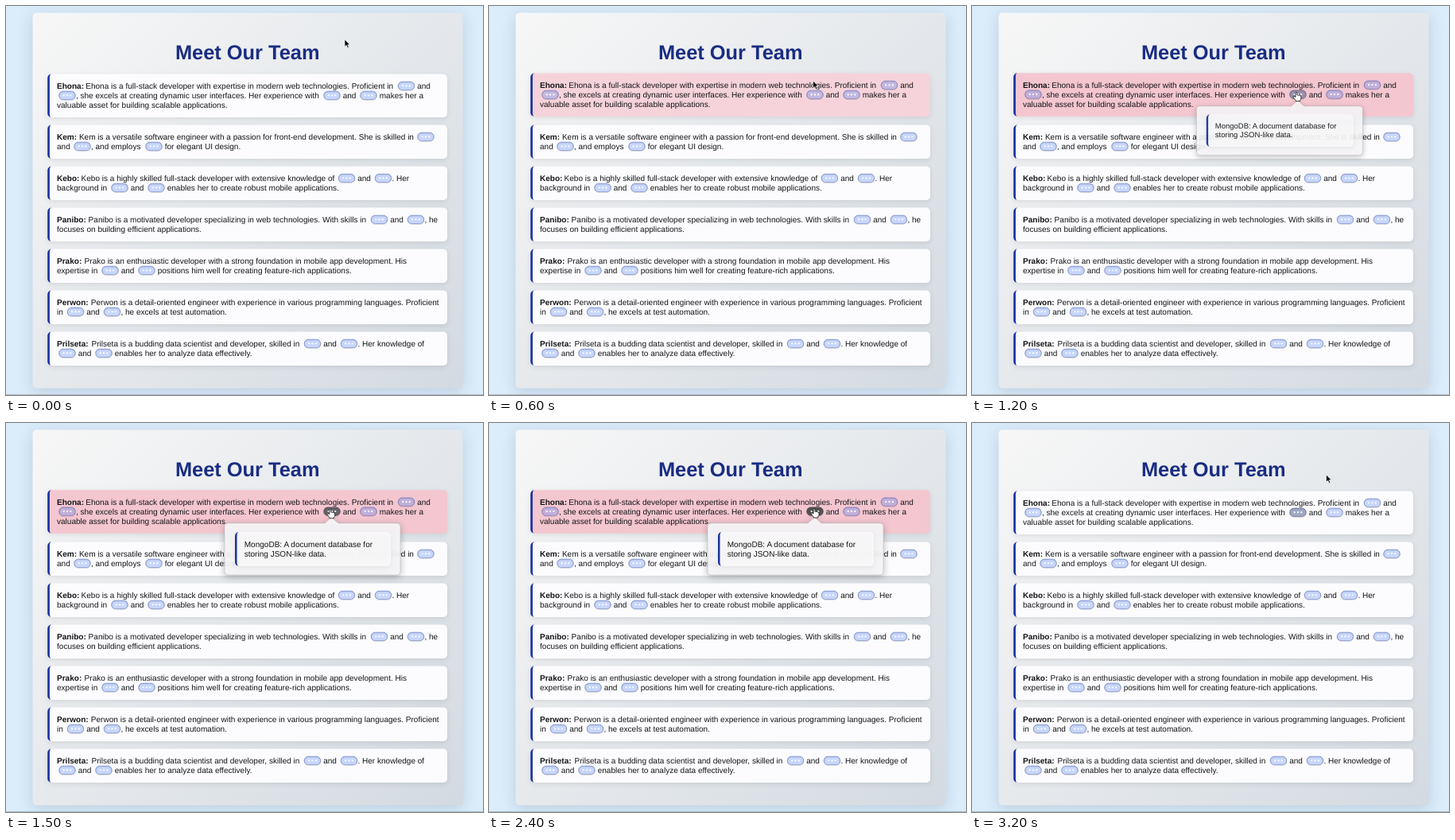
Animation of 600x489 px, one loop 3.3 s. Source, as an HTML page:

```html
<!DOCTYPE html>
<html lang="en">
<head>
<meta charset="utf-8">
<title>Meet Our Team</title>
<style>
  html, body { margin: 0; width: 100%; height: 100%; overflow: hidden; background: #dbecfa; }
  svg { display: block; width: 600px; height: 489px; }
  text { font: 10.05px Arial, "Liberation Sans", sans-serif; fill: #151618; white-space: pre; text-rendering: geometricPrecision; }
  .bold { font-weight: bold; }
  .title { font-size: 25.4px; font-weight: bold; fill: #1a2d82; text-anchor: middle; }
  .panel { filter: drop-shadow(0 4px 9px rgba(20, 50, 80, .16)); }
  .card { filter: drop-shadow(0 2px 3px rgba(0, 0, 0, .09)); }
  .popup { filter: drop-shadow(0 2px 4px rgba(0, 0, 0, .28)); }
</style>
</head>
<body>
<svg id="stage" viewBox="0 0 600 489">
  <defs>
    <linearGradient id="panelFill" gradientUnits="userSpaceOnUse" x1="51" y1="-9" x2="557" y2="497">
      <stop stop-color="#f7f7f7"/><stop offset="1" stop-color="#d3dae1"/>
    </linearGradient>
  </defs>
  <rect width="600" height="489" fill="#dbecfa"/>
  <rect class="panel" x="33.5" y="8.5" width="541" height="472" rx="5" fill="url(#panelFill)"/>
  <rect y="488" width="600" height="1" fill="#a9bac8"/>
  <text class="title" x="303.7" y="67.3">Meet Our Team</text>
  <g id="cards"></g>
  <g id="tooltip">
    <path class="popup" d="M279 126H401L409.5 118.500L418 126H492Q496 126 496 130V187Q496 191 492 191H279Q275 191 275 187V130Q275 126 279 126Z"
      fill="#f7f7f9" fill-opacity=".93" stroke="#bcbcc0" stroke-width=".6"/>
    <g id="note"></g>
  </g>
  <path id="arrow" d="M0 0V9.300L2.200 7.300L3.700 10.800L5.300 10.100L3.800 6.700H6.700Z" fill="#000" stroke="#fff" stroke-width=".7"/>
  <path id="hand" d="M-1 .8Q0-.4 1 .8V4Q2 3.300 2.800 4.200Q3.800 3.600 4.500 4.600Q5.800 4.200 6 5.600V8Q5.800 9.500 4.800 10.300V11.500H-.8V10.500Q-2.200 9-3.800 6.700Q-4.300 5.500-3 5.300Q-2 5.500-1 6.700Z"
    fill="#fff" stroke="#111" stroke-width=".8" stroke-linejoin="round"/>
</svg>
<script>
const LOOP = 3300, FRAME = 100, LINE = 12;
const byId = id => document.getElementById(id);

// "@x" places a chip centred on x
const people = [
  { name: "Ehona", x: 100.2, lines: [
    "Ehona is a full-stack developer with expertise in modern web technologies. Proficient in @503.5 and",
    "@77, she excels at creating dynamic user interfaces. Her experience with @410 and @456 makes her a",
    "valuable asset for building scalable applications."] },
  { name: "Kem", x: 91.9, lines: [
    "Kem is a versatile software engineer with a passion for front-end development. She is skilled in @528",
    "and @96, and employs @186 for elegant UI design."] },
  { name: "Kebo", x: 94.5, lines: [
    "Kebo is a highly skilled full-stack developer with extensive knowledge of @428.5 and @474.5. Her",
    "background in @143 and @189 enables her to create robust mobile applications."] },
  { name: "Panibo", x: 103.6, lines: [
    "Panibo is a motivated developer specializing in web technologies. With skills in @469.5 and @515.5, he",
    "focuses on building efficient applications."] },
  { name: "Prako", x: 98.6, lines: [
    "Prako is an enthusiastic developer with a strong foundation in mobile app development. His",
    "expertise in @131 and @177 positions him well for creating feature-rich applications."] },
  { name: "Perwon", x: 106.8, lines: [
    "Perwon is a detail-oriented engineer with experience in various programming languages. Proficient",
    "in @87.5 and @133.5, he excels at test automation."] },
  { name: "Prilseta", x: 107.5, lines: [
    "Prilseta is a budding data scientist and developer, skilled in @385.5 and @431.5. Her knowledge of",
    "@77 and @123 enables her to analyze data effectively."] }
];

function add(parent, tag, attrs, content) {
  const node = document.createElementNS("http://www.w3.org/2000/svg", tag);
  for (const key in attrs) node.setAttribute(key, attrs[key]);
  if (content) node.textContent = content;
  parent.append(node);
  return node;
}

// Rounded box whose left border tapers into the corners
function addBox(parent, x, y, width, height, border, opacity = 1) {
  const r = 5, bottom = y + height, inner = r - border;
  const box = add(parent, "rect", { class: "card", x, y, width, height, rx: r, fill: "#fcfcfe", "fill-opacity": opacity });
  add(parent, "path", { fill: "#1a32a0", d:
    `M${x + r} ${y}A${r} ${r} 0 0 0 ${x} ${y + r}V${bottom - r}A${r} ${r} 0 0 0 ${x + r} ${bottom}` +
    `A${inner} ${r} 0 0 1 ${x + border} ${bottom - r}V${y + r}A${inner} ${r} 0 0 1 ${x + r} ${y}Z` });
  return box;
}

function addChip(parent, cx, cy) {
  const shape = { x: cx - 10.2, y: cy - 5.2, width: 20.4, height: 10.4, rx: 5 };
  add(parent, "rect", { ...shape, y: cy - 4.5, fill: "none", stroke: "rgba(0,0,0,.2)" });
  const body = add(parent, "rect", { ...shape, "stroke-width": .8 });
  paintChip(body, 0);
  for (const dx of [-4.3, 0, 4.3]) add(parent, "circle", { cx: cx + dx, cy, r: 1.15, fill: "#fff" });
  return body;
}

function addLine(parent, line, start, y) {
  let x = start;
  for (const part of line.split(/(@\d+(?:\.\d)?)/)) {
    if (part[0] === "@") {
      const cx = +part.slice(1);
      chips.push(addChip(parent, cx, y - 3.7));
      x = cx + 10.9;
    } else if (part) add(parent, "text", { x, y }, part);
  }
}

const mix = (a, b, p) => a + (b - a) * p;

// Blends premultiplied colours, as CSS transitions do
function mixColor(a, b, p) {
  const alpha = mix(a[3], b[3], p);
  const rgb = [0, 1, 2].map(i => (mix(a[i] * a[3], b[i] * b[3], p) / alpha).toFixed(2));
  return `rgba(${rgb},${alpha.toFixed(3)})`;
}

function paintChip(chip, p) {
  chip.setAttribute("fill", mixColor([70, 120, 245, .29], [70, 70, 70, .92], p));
  chip.setAttribute("stroke", mixColor([65, 90, 185, .5], [75, 75, 78, .9], p));
}

function bezier(x1, y1, x2, y2) {
  const curve = (a, b, s) => 3 * a * s * (1 - s) ** 2 + 3 * b * s * s * (1 - s) + s ** 3;
  return x => {
    if (x <= 0) return 0;
    if (x >= 1) return 1;
    let lo = 0, hi = 1;
    for (let i = 0; i < 24; i++) {
      const mid = (lo + hi) / 2;
      if (curve(x1, x2, mid) < x) lo = mid; else hi = mid;
    }
    return curve(y1, y2, lo);
  };
}
const ease = bezier(.25, .1, .25, 1), easeInOut = bezier(.42, 0, .58, 1);

const hover = (t, enter, leave, duration, curve) =>
  t < leave ? curve((t - enter) / duration) : 1 - curve((t - leave) / duration);

// time, x, y of the pointer tip
const path = [
  [0, 426, 42], [100, 425, 45], [300, 418, 65], [600, 407.5, 94], [800, 407, 105], [1000, 408, 108],
  [1900, 407.5, 108.5], [2400, 409, 107.5], [2600, 415, 99], [2800, 432.5, 74.5], [3000, 443, 67], [3200, 445.5, 65]
];

function pointerAt(t) {
  const i = Math.min(path.length - 1, path.findIndex(p => p[0] > t) >>> 0);
  const [t0, x0, y0] = path[i - 1], [t1, x1, y1] = path[i];
  const p = Math.min(1, (t - t0) / (t1 - t0));
  return [mix(x0, x1, p), mix(y0, y1, p)];
}

const chips = [], cards = [];
people.forEach(({ name, x, lines }, i) => {
  const group = add(byId("cards"), "g", {});
  const top = i ? 97.5 + 52 * i : 85.5;
  const fill = addBox(group, 52.2, top, 502.8, 18.5 + lines.length * LINE, 2.7);
  const base = top + 18.5;
  add(group, "text", { class: "bold", x: 64, y: base }, name + ":");
  lines.forEach((line, n) => addLine(group, line, n ? 64 : x, base + n * LINE));
  cards.push({ group, fill });
});
const note = byId("note");
addBox(note, 288, 137, 196, 43, 2.5, .7);
add(note, "text", { x: 299.7, y: 156 }, "MongoDB: A document database for");
add(note, "text", { x: 299.7, y: 167.8 }, "storing JSON-like data.");

function render(t) {
  const lift = hover(t, 460, 2680, 300, ease);
  cards[0].group.setAttribute("transform", `translate(0 ${-1.2 * lift})`);
  cards[0].fill.setAttribute("fill", mixColor([252, 252, 254, 1], [244, 198, 208, 1], lift));
  paintChip(chips[2], hover(t, 790, 2600, 1000, easeInOut));

  const open = hover(t, 845, 2600, 500, ease);
  const tooltip = byId("tooltip");
  tooltip.setAttribute("opacity", open);
  tooltip.setAttribute("transform", `translate(411 125) scale(${open}) translate(-411 -125)`);

  const [x, y] = pointerAt(t);
  const overChip = t >= 790 && t < 2600;
  for (const [id, shown] of [["arrow", !overChip], ["hand", overChip]]) {
    byId(id).setAttribute("transform", `translate(${x} ${y})`);
    byId(id).setAttribute("visibility", shown ? "visible" : "hidden");
  }
}

const start = performance.now();
function tick() {
  const t = (performance.now() - start) % LOOP;
  render(Math.floor(t / FRAME) * FRAME);
  requestAnimationFrame(tick);
}
tick();
</script>
</body>
</html>
```
